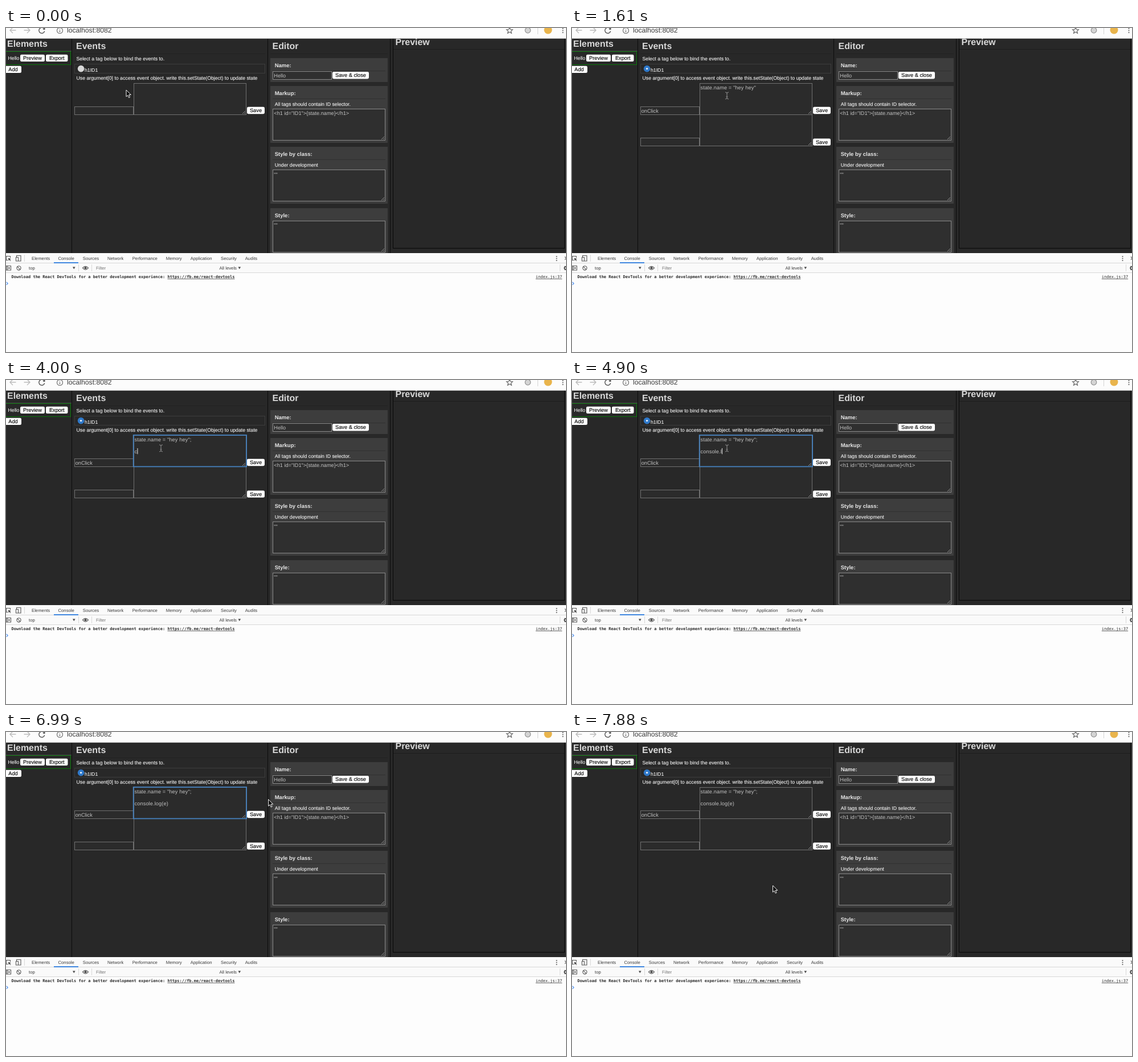
Animation, 983 px wide and 570 px high, one loop 8 s. Source, as an HTML page:

```html
<!DOCTYPE html>
<html lang="en">
<head>
<meta charset="utf-8">
<title>Event editor</title>
<style>
  html, body { margin: 0; width: 100%; height: 100%; overflow: hidden; background: #282828; }
  svg { display: block; }
  text { font: 8.72px "Liberation Sans", Arial, sans-serif; fill: #f2f2f2; stroke: #f2f2f2; stroke-width: .12px; text-rendering: geometricPrecision; }
  .h { font-size: 15.95px; font-weight: bold; fill: #d8d8d8; stroke: none; }
  .label { font-size: 9.5px; font-weight: bold; fill: #e6e6e6; stroke: none; }
  .field { font-size: 9.2px; fill: #c2c2c2; stroke: none; }
  .code { letter-spacing: .12px; }
  .url { font-size: 12.2px; fill: #3c3c3c; stroke: none; }
  .dev text { font-size: 7.72px; fill: #3c3c3c; stroke: none; }
  .dev .mono { font: 7px "DejaVu Sans Mono", monospace; fill: #2a2a2a; }
  .dev .bold { font-weight: bold; }
  .button rect { fill: #fff; }
  .button text { font-size: 9.25px; fill: #000; stroke: #000; text-anchor: middle; }
  .box { fill: #2f2f2f; stroke: #8a8a8a; }
  .events .box { fill: #2b2b2b; stroke: #707070; }
  .line { fill: none; stroke: #555; stroke-width: 1.1; }
  .crisp { shape-rendering: crispEdges; }
</style>
</head>
<body>
<svg id="stage" width="983" height="570" viewBox="0 0 983 570">
  <defs>
    <g id="grip"><path d="M-6 -1L-1 -6M-3 -1L-1 -3" stroke="#aaa" stroke-width=".8"/></g>
    <path id="drop" d="M0 0h4.6l-2.3 4z" fill="#4a4a4a"/>
    <g id="dots"><circle r="1"/><circle cy="3.5" r="1"/><circle cy="7" r="1"/></g>
  </defs>

  <rect width="983" height="570" fill="#282828"/>

  <!-- page columns -->
  <g class="crisp" fill="#0c0c0c">
    <rect x="115" y="19" width="1" height="377"/>
    <rect x="459" y="19" width="1" height="377"/>
    <rect x="674" y="19" width="1" height="377"/>
    <rect x="120" y="45" width="335" height="1" fill="#222"/>
    <rect x="464" y="45" width="206" height="1" fill="#222"/>
    <rect x="680" y="37" width="300" height="1" fill="#1c1c1c"/>
    <rect x="0" y="40" width="115" height="1" fill="#4a4a4a"/>
    <rect x="679.5" y="10.5" width="301" height="377" fill="none" stroke="#080808"/>
    <rect x="-.5" y="41.5" width="114" height="23" fill="none" stroke="#087808"/>
    <rect x="120.5" y="63.5" width="334" height="16" fill="none" stroke="#3d3d3d"/>
  </g>
  <text class="h" x="2" y="32.7">Elements</text>
  <text class="h" x="123" y="37.3">Events</text>
  <text class="h" x="467.5" y="37.3">Editor</text>
  <text class="h" x="683.5" y="29.6">Preview</text>

  <text x="3.5" y="56.3">Hello</text>
  <text x="123.5" y="57.2">Select a tag below to bind the events to.</text>
  <text x="138" y="76.8">h1ID1</text>
  <text x="123.5" y="91.3">Use argument[0] to access event object. write this.setState(Object) to update state</text>
  <circle id="radio" cx="131.6" cy="71.6" r="5.8"/>
  <circle id="dot" cx="131.6" cy="71.6" r="1.7" fill="#e8f0fa"/>

  <g id="cards"></g>
  <g id="fields" class="events"></g>

  <g id="second" class="events"></g>
  <text id="event" class="field" x="121.7" y="148.6">onClick</text>
  <text id="line1" class="field code" x="225.5" y="108"></text>
  <text id="line3" class="field code" x="225.5" y="128.8"></text>
  <rect id="ring" x="223.7" y="97" width="198.4" height="55.4" fill="none" stroke="#4580bd" stroke-width="1.8"/>
  <rect id="caret" width="1" height="10.4" fill="#e4e4e4"/>

  <g id="buttons"></g>

  <!-- browser bar -->
  <rect width="983" height="18.6" fill="#fcfcfc"/>
  <g fill="none" stroke-width="1.4">
    <path d="M17.5 4H7.500M12 -1L7 4l5 5M31.500 4H42M37 -1l5 5-5 5" stroke="#bcbcbc"/>
    <path d="M67 1.500A5 5 0 1 0 67.700 5.500" stroke="#555"/>
    <path d="M68.500 -1v4h-4z" fill="#555" stroke="none"/>
    <circle cx="94.500" cy="4.500" r="5" stroke="#666" stroke-width="1.1"/>
    <path d="M94.500 4v3.500M94.500 1.300v1.300" stroke="#666" stroke-width="1.2"/>
    <path d="M884 -1l1.500 3.600 3.900.3-3 2.500 1 3.800-3.400-2.100-3.400 2.100 1-3.800-3-2.500 3.900-.3z" stroke="#555" stroke-width="1.1"/>
    <circle cx="916" cy="4" r="4.800" fill="#d4d4d4" stroke="#929292" stroke-width="1.200"/>
    <path d="M933.500 0v11" stroke="#d5d5d5" stroke-width="1"/>
  </g>
  <circle cx="951.500" cy="3.500" r="7" fill="#e9b44c"/>
  <use href="#dots" x="977.500" y="1" fill="#555"/>
  <text class="url" x="107" y="8.3">localhost:8082</text>

  <!-- developer tools -->
  <g class="dev">
    <rect y="396" width="983" height="174" fill="#fdfdfd"/>
    <rect y="396" width="983" height="34" fill="#fafafa"/>
    <g class="crisp" fill="#d8d8d8">
      <rect y="413" width="983" height="1"/>
      <rect y="430" width="983" height="1"/>
      <rect x="32" y="399" width="1" height="12"/>
      <rect x="127" y="416" width="1" height="12"/>
      <rect x="150" y="416" width="1" height="12"/>
      <rect x="972" y="416" width="1" height="12"/>
      <rect x="84" y="412" width="43" height="2" fill="#3f87e0"/>
    </g>
    <g id="tabs"></g>
    <g class="line">
      <path d="M3.500 408.500H.5v-7h7v3"/>
      <path d="M4 404.500l5 1.900-2.200.8 1.700 2.300-.9.6-1.600-2.300-1.300 1.700z" fill="#444" stroke="none"/>
      <path d="M18.500 403v-2.500h7.500v9.500h-4M17.500 403.500h4v6.500h-4z"/>
      <path d="M.5 418.500h8v7.500h-8zM2.500 418.500v7.500"/>
      <path d="M4.500 420.300l2.700 2-2.700 2z" fill="#444" stroke="none"/>
      <circle cx="22.500" cy="422.300" r="3.600"/>
      <path d="M20 419.800l5 5"/>
      <path d="M134.500 422.200q5-6 10 0q-5 6-10 0z"/>
      <circle cx="139.500" cy="422.200" r="1.600" fill="#444"/>
      <path d="M981 402.500l5 5M981 407.500l5-5"/>
      <circle cx="983" cy="422.300" r="2.600" stroke-width="2"/>
      <path d="M979 422.300h2M980.500 419l1.500 1.500M980.500 425.500l1.500-1.500"/>
    </g>
    <use href="#dots" x="966.500" y="402" fill="#555"/>
    <use href="#drop" x="117" y="420.300"/>
    <use href="#drop" x="407.500" y="420.300"/>
    <text x="40" y="425">top</text>
    <text x="158" y="425.200" style="fill:#757575">Filter</text>
    <text x="374.500" y="425">All levels</text>
    <text class="mono bold" x="9.500" y="440">Download the React DevTools for a better development experience: <tspan text-decoration="underline">https://fb.me/react-devtools</tspan></text>
    <text class="mono" x="929.800" y="440" text-decoration="underline">index.js:37</text>
    <path d="M.8 447l2.400 2.400-2.400 2.400" fill="none" stroke="#3f87f0" stroke-width="1.100"/>
  </g>

  <path id="arrow" d="M0 0V11.800L2.700 9.300 4.600 13.600 6.600 12.700 4.700 8.500H8.300Z" fill="#0b0b0b" stroke="#f4f4f4" stroke-width="1"/>
  <path id="beam" d="M-3 -6Q0 -6 0 -4Q0 -6 3 -6M0 -4.500V4.500M-3 6Q0 6 0 4Q0 6 3 6M-1.500 2H1.500" fill="none" stroke="#929292" stroke-width="1"/>
</svg>

<script>
const LOOP = 8000;
const $ = id => document.getElementById(id);
const add = (id, markup) => { $(id).innerHTML += markup; };
const show = (id, on) => $(id).setAttribute('visibility', on ? 'visible' : 'hidden');

const label = (cls, x, y, text) => `<text class="${cls}" x="${x}" y="${y}">${text}</text>`;
const box = (x, y, w, h) =>
  `<rect class="box crisp" x="${x + .5}" y="${y + .5}" width="${w}" height="${h}"/>`;
const area = (x, y, w = 197, h = 55) => box(x, y, w, h) + `<use href="#grip" x="${x + w}" y="${y + h}"/>`;
const button = (x, y, w, text) =>
  `<g class="button"><rect x="${x}" y="${y}" width="${w}" height="12.4" rx="2.4"/>` +
  `<text x="${x + w / 2}" y="${y + 9.4}">${text}</text></g>`;
const card = (y, h, title) =>
  `<rect x="464" y="${y}" width="206" height="${h}" fill="#3d3d3d"/>` +
  `<rect class="crisp" x="468" y="${y + 22}" width="198" height="1" fill="#303030"/>` +
  label('label', 471.7, y + 16, title);
const row = y => box(120, y + 41, 103, 14) + area(224, y);

add('cards',
  card(53, 42, 'Name:') + card(102, 100, 'Markup:') +
  card(209, 100, 'Style by class:') + card(317, 80, 'Style:') +
  box(468, 76, 103, 14) + area(468, 142) + area(468, 249) + area(468, 339) +
  label('field', 470.3, 86.7, 'Hello') +
  label('', 471.7, 136.5, 'All tags should contain ID selector.') +
  label('field', 470.3, 153.4, '&lt;h1 id="ID1"&gt;{state.name}&lt;/h1&gt;') +
  label('', 471.7, 243.7, 'Under development') +
  label('field', 470.3, 260.6, '""') + label('field', 470.3, 350.3, '""'));
add('fields', row(97));
add('second', row(152) + button(423, 194.4, 31, 'Save'));
add('buttons',
  button(25, 46.7, 43, 'Preview') + button(70, 46.7, 38.5, 'Export') +
  button(-2, 66.7, 29, 'Add') + button(423, 138.8, 31, 'Save') +
  button(573, 77, 64, 'Save &amp; close'));

const tabs = { Elements: 45, Console: 91.5, Sources: 134.8, Network: 178, Performance: 221.7,
  Memory: 280.8, Application: 323.8, Security: 377, Audits: 419.7 };
for (const [name, x] of Object.entries(tabs)) add('tabs', label('', x, 407.7, name));

// time, pointer, x, y
const pointer = [
  [0, 'arrow', 211, 109], [150, 'arrow', 207, 107], [300, 'arrow', 190, 99],
  [450, 'arrow', 165, 88], [600, 'arrow', 143, 77], [740, 'arrow', 131, 72],
  [880, 'arrow', 128.5, 70.5], [1030, 'arrow', 134, 73], [1180, 'beam', 236, 106],
  [1320, 'beam', 256, 113], [1470, 'beam', 268, 118], [1610, 'beam', 272, 119],
  [1760, 'beam', 272, 120], [6690, 'beam', 300, 120], [6840, 'beam', 405, 114],
  [6990, 'arrow', 460.5, 118.5], [7140, 'arrow', 464, 130], [7290, 'arrow', 440, 144],
  [7430, 'arrow', 438, 147], [7580, 'arrow', 400, 204], [7730, 'arrow', 361, 256],
  [7880, 'arrow', 352.5, 270]
];

// time, first line length, caret line, third line length
const first = 'state.name = "hey hey";';
const third = 'console.log(e)';
const typing = [
  [1030, 22, 0, 0], [3110, 23, 0, 0], [3260, 23, 1, 0], [3560, 23, 2, 0],
  [4000, 23, 2, 1], [4150, 23, 2, 2], [4300, 23, 2, 4], [4450, 23, 2, 5],
  [4600, 23, 2, 6], [4750, 23, 2, 8], [4900, 23, 2, 9], [5050, 23, 2, 10],
  [5200, 23, 2, 11], [5640, 23, 2, 12], [5940, 23, 2, 13], [6240, 23, 2, 14]
];

const latest = (cues, t) => cues.findLast(cue => cue[0] <= t);
const within = (t, from, to) => t >= from && t < to;

function draw(t) {
  const [, kind, x, y] = latest(pointer, t);
  for (const id of ['arrow', 'beam']) show(id, id === kind);
  $(kind).setAttribute('transform', `translate(${x} ${y})`);

  const picked = t >= 1030;
  $('radio').setAttribute('fill', picked ? '#2f78c8' : t >= 880 ? '#b4b4b4' : '#d8d8d8');
  for (const id of ['dot', 'second', 'event']) show(id, picked);

  const [, a, line, b] = latest(typing, t) || [0, 0, 0, 0];
  $('line1').textContent = first.slice(0, a);
  $('line3').textContent = third.slice(0, b);

  show('ring', within(t, 1760, 7430));
  show('caret', within(t, 1760, 2210) || within(t, 2810, 6690));
  const typed = line === 1 ? 0 : $(line ? 'line3' : 'line1').getComputedTextLength();
  $('caret').setAttribute('x', 225.7 + typed);
  $('caret').setAttribute('y', 99.2 + line * 10.4);
}

const start = performance.now();
function tick() {
  draw((performance.now() - start) % LOOP);
  requestAnimationFrame(tick);
}
tick();
</script>
</body>
</html>
```
